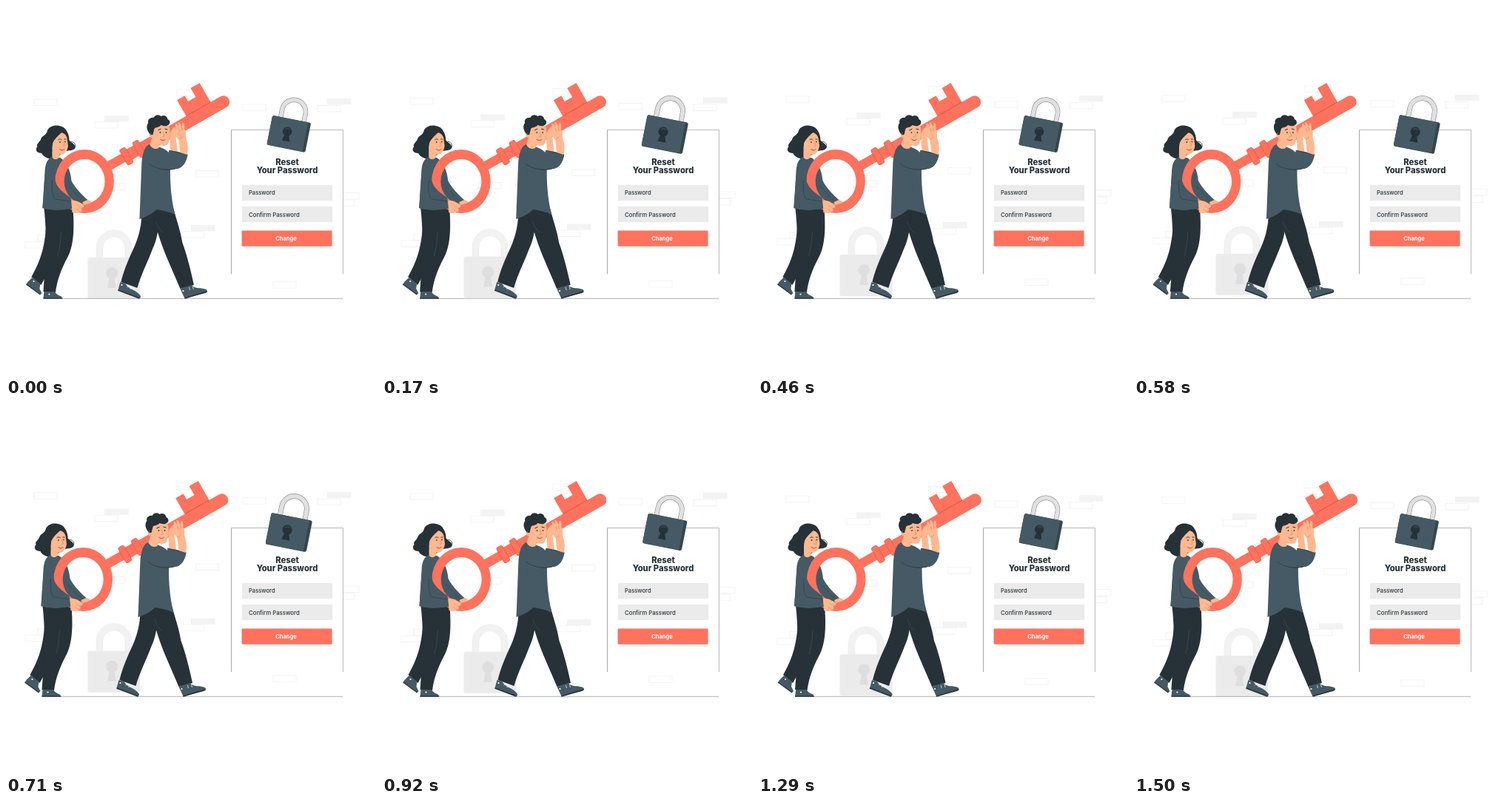
An HTML page with a canvas for the animation above (1.54 s loop, 500 px wide and 500 px high).

```html
<!DOCTYPE html>
<html lang="en">
<head>
<meta charset="utf-8">
<title>Reset Your Password</title>
<style>
html, body { margin: 0; width: 100%; height: 100%; overflow: hidden; background: #fff; }
canvas { display: block; width: 500px; height: 500px; }
</style>
</head>
<body>
<canvas id="stage"></canvas>
<script>
const LOOP = 1540, CYCLE = 1500;
const RED = '#ff725e', RED_LINE = '#c9503f', SKIN = '#ffb88f', SKIN_LINE = '#c9825f';
const SLATE = '#455a64', SHADE = '#37474f', DARK = '#263238', PALE = '#ebebeb';
const canvas = document.getElementById('stage');
const ctx = canvas.getContext('2d');
const ratio = window.devicePixelRatio || 1;
canvas.width = canvas.height = 500 * ratio;

const cache = new Map();
function shape(d) {
  if (!cache.has(d)) cache.set(d, new Path2D(d));
  return cache.get(d);
}
function fill(d, color) {
  ctx.fillStyle = color;
  ctx.fill(shape(d));
}
function line(d, color, width = 0.6) {
  ctx.strokeStyle = color;
  ctx.lineWidth = width;
  ctx.stroke(shape(d));
}
function box(x, y, w, h, color, r = 0) {
  ctx.fillStyle = color;
  ctx.beginPath();
  ctx.roundRect(x, y, w, h, r);
  ctx.fill();
}
function dot(x, y, rx, ry, color) {
  ctx.fillStyle = color;
  ctx.beginPath();
  ctx.ellipse(x, y, rx, ry, 0, 0, 7);
  ctx.fill();
}
function label(text, x, y, font, color, align = 'left') {
  ctx.font = font + ' Inter, sans-serif';
  ctx.fillStyle = color;
  ctx.textAlign = align;
  ctx.fillText(text, x, y);
}
function group(dx, dy, draw) {
  ctx.save();
  ctx.translate(dx, dy);
  draw();
  ctx.restore();
}

// Eased value between [time, value] stops.
function track(stops, t) {
  let i = 1;
  while (i < stops.length - 1 && t > stops[i][0]) i++;
  const [t0, a] = stops[i - 1], [t1, b] = stops[i];
  const k = Math.min(1, Math.max(0, (t - t0) / (t1 - t0)));
  return a + (b - a) * (1 - Math.cos(Math.PI * k)) / 2;
}
const SWAY = [[0, 0], [270, 1.1], [470, -1], [690, -2], [915, 1.1], [1090, -0.7], [1500, 0]];
const BEAT = [[0, 1], [210, 1.07], [420, 1], [630, 1.07], [1050, 1], [1500, 1]];

function drawBlocks() {
  ctx.strokeStyle = '#f1f1f1';
  ctx.lineWidth = 0.8;
  const outlines = [
    [38, 126], [120, 156.5], [231, 113], [320, 133], [421, 134.5], [256.5, 222.5],
    [26, 318.5], [43, 309.5], [237, 304.5], [361, 373], [446, 252.5], [440, 262], [130, 240]
  ];
  for (const [x, y] of outlines) ctx.strokeRect(x, y, 31, 8.5);
  for (const [x, y] of [[434, 125], [133, 148], [250, 296]]) box(x, y, 32.5, 8.3, '#f3f3f3');
}

function drawPalePadlock() {
  line('M126.5 341V327A19.5 19.5 0 0 1 165.5 327V341', '#f2f2f2', 9);
  line('M122 340V327A24 24 0 0 1 170 327V340M131 340V327A15 15 0 0 1 161 327V340', '#e6e6e6', 0.5);
  box(110.5, 340, 71, 56, PALE, 3);
  dot(143.2, 361, 8, 8, '#dedede');
  fill('M140.2 366H146.2L149 381H137Z', '#dedede');
}

function drawForm() {
  box(304.5, 167.5, 151, 195, '#fff');
  line('M304.5 362V167.5', '#909090', 0.8);
  line('M304.5 167.5H455.5V362', '#aaa', 0.8);
  label('Reset', 380, 214.5, '800 11.3px', DARK, 'center');
  label('Your Password', 380, 226.2, '800 11.2px', DARK, 'center');
  box(319, 242, 122, 21, PALE, 0.6);
  box(319, 271, 122, 21, PALE, 0.6);
  label('Password', 328, 254.7, '500 7.6px', DARK);
  label('Confirm Password', 328, 284.7, '500 7.8px', DARK);
  box(318.6, 303.5, 122, 21.2, RED, 1);
  label('Change', 378.5, 316.7, '700 7.5px', '#fff', 'center');
}

function drawPadlock(scale) {
  ctx.save();
  ctx.translate(382, 162);
  ctx.scale(scale, scale);
  ctx.translate(0, 11);
  ctx.rotate(0.195);
  const arch = 'M-15 -17V-31A16 16 0 0 1 17 -31V-17';
  line(arch, '#777', 6.4);
  line(arch, '#e0e0e0', 5.5);
  box(-26.3, -20.5, 53, 40.6, SHADE, 2.5);
  box(-26.3, -20.5, 49.8, 40, SLATE, 2.5);
  line('M23.5 -19V19', DARK, 0.5);
  dot(-2.4, -3, 6.2, 6.2, DARK);
  fill('M-4.6 0H0L3.4 10H-7.4Z', DARK);
  line('M-5.8 -5A4.6 4.6 0 0 1 1 -6', '#607580', 0.5);
  ctx.restore();
}

function drawWoman() {
  // Legs and shoes
  fill('M55 295C53 324 49 341 35 366L48 377C60 356 70 335 74 318Z', DARK);
  fill('M52 273C55 300 56 330 51 386L67.5 387C70 368 76 355 82 343C93 325 93 300 91 272Z', DARK);
  line('M75 305C74 322 72 332 70 338', '#4d5b61', 0.5);
  fill('M36 367L47 375L46 382L49 388L47 390L28 376L30 373Z', SLATE);
  line('M28 376L47 390', DARK, 1.2);
  fill('M52 386H66L70 390L76 393V395.5H51Z', SLATE);
  line('M51 395H77', DARK, 1.2);
  dot(38, 372, 1.1, 1.1, '#fff');
  dot(59, 389.5, 1.1, 1.1, '#fff');

  // Sweater, hair and face
  fill('M62 163C68 160 79 162 82 168C85 172 86 177 86 181C88 185 95 186 94 192C91 196 85 195 82 196L68 205C60 209 51 204 49 199C43 199 39 195 43 190C41 186 47 184 48 179C50 175 54 175 56 170C57 166 59 164 62 163Z', DARK);
  line('M88 183C95 184 96 190 92 193', DARK, 0.8);
  fill('M62 204C55 208 53 216 53 228L50 273C63 277 77 276 91 273L111 266L112 263C103 255 94 246 89 236C88 222 82 210 74 205Z', SLATE);
  line('M86 244L105 264', SHADE, 0.6);
  fill('M64 178C67 168 80 169 83 178L84.5 189C83.5 197 79 202 73 200.5L72 205C68 209 63 207 63 203L63 192Z', SKIN);
  fill('M63 196C61 184 67 179 78 169L70 166C57 167 55 184 58 200Z', DARK);
  line('M71 181C73 179 75 180 76 181M79 180L82 180', DARK, 0.9);
  dot(73.5, 184, 0.8, 1, DARK);
  dot(80.5, 183.5, 0.8, 1, DARK);
  line('M78 183L80 189L77 189.5', SKIN_LINE);
  line('M73 193C75 195.5 78 195.5 80 193', '#8c4638', 0.9);
}

function drawKey() {
  ctx.save();
  ctx.translate(106.7, 237);
  ctx.fillStyle = RED;
  ctx.beginPath();
  ctx.ellipse(0, 0, 39.8, 43, 0, 0, 7);
  ctx.ellipse(0, 0, 27.5, 30, 0, 0, 7);
  ctx.fill('evenodd');
  ctx.rotate(-0.518);
  box(36, -8, 36, 12.5, RED);
  box(66, -9.5, 24, 16, RED);
  box(85, -8.7, 139.5, 16.7, RED, [0, 8, 8, 0]);
  fill('M163 -6V-33.5H175V-24.5H187V-38.5H201V-6Z', RED);
  line('M163.5 -8.7H201', RED_LINE, 0.7);
  for (const u of [61.5, 81.5]) {
    box(u, -13.5, 9, 24, RED, 2.5);
    ctx.strokeStyle = RED_LINE;
    ctx.lineWidth = 0.5;
    ctx.stroke();
  }
  ctx.restore();
}

function drawWomanArm() {
  fill('M56 214C62 216 67 226 67 235C69 246 78 252 88 259L90 274C75 276 61 276 50 273L53 228Z', SLATE);
  line('M63 236C62 248 63 257 67 261L88 264', DARK, 0.5);
  fill('M104 265L111 262C116 263 118 266 113 267L106 269Z', SKIN);
  fill('M89 263C95 262 100 265 104 268C108 270 106 273 102 273C105 276 103 278 100 278C98 281 94 280 90 279Z', SKIN);
  line('M97 269L102 273M96 274L100 278', SKIN_LINE, 0.5);
}

function drawMan() {
  // Legs and shoes
  fill('M198 272C202 300 212 326 220.5 346L236 382L254.5 377C250 355 244 333 239 320C236 302 231 289 227 274Z', DARK);
  fill('M184 279C184 300 178 318 171 332C164 347 159 360 156 373L178 381C183 363 192 346 198 330C203 319 207 309 209 272Z', DARK);
  line('M203 291C207 301 209 303 213 306', '#4d5b61', 0.5);
  fill('M155 373L162 375C166 383 175 383 181 390C184 393 182 395 180 395L152 384Z', SLATE);
  line('M152 384L181 395', DARK, 1.5);
  fill('M236 382L251 377C256 383 265 380 271 383C274 385 272 387 270 388L242 395Z', SLATE);
  line('M242 395L272 386', DARK, 1.5);
  dot(157, 377, 1.1, 1.1, '#fff');
  dot(240, 385, 1.1, 1.1, '#fff');
  line('M164 380L167 378M168 383L171 380M249 384L248 380M254 383L253 379', '#fff', 0.7);

  // Far hand
  fill('M222 177C221 170 226 164 231 162L234 171L230 178L233 200L223 200Z', SKIN);

  // Shirt
  fill('M194 187C188 190 185 199 184 211L181 288C188 286 198 281 204 275C212 276 221 278 229 282C225 265 222.5 248 222.5 223L223 201C219 195 213 192 206 190Z', SLATE);
  fill('M194 212C202 221 217 224 230 220C238 220 243 212 246 202L235 198C230 203 219 204 211 202C203 201 198 205 194 212Z', SHADE);
  fill('M190 204C197 196 208 196 220 199L221 195L233 197L246 200C245 211 239 220 230 220C215 222 201 221 190 213Z', SLATE);
  line('M194 213C203 221 216 222 230 220M221 195L246 201', DARK, 0.6);

  // Head
  fill('M197 165C200 158 218 157 221 162C223 171 222 181 219 187C216 190 211 189 208 187L207 192C202 195 196 191 195 187L198 178C193 178 193 170 197 169Z', SKIN);
  fill('M196 174C190 168 190 161 193 158C191 153 197 150 200 151C203 146 208 147 210 149C215 146 219 150 219 153C224 155 222 161 219 161C216 164 212 161 210 161C207 165 203 163 201 166L199 174Z', DARK);
  line('M206 168L210 166M215 166L219 167', DARK, 1);
  dot(209, 171, 0.8, 1, DARK);
  dot(217, 171, 0.8, 1, DARK);
  line('M213 170L215 176L211.5 177', SKIN_LINE);
  line('M209 180C211 182 214 182 216 180', '#8c4638', 0.9);
  line('M197 171C195 172 196 176 198 176', SKIN_LINE, 0.5);

  // Near hand
  fill('M236 198L234 181C229 176 229 170 230 167L229 160C230 157 233 160 234 165L233 158C235 155 237 159 238 164L239 158C242 157 242 162 242 167C245 170 243 175 244 179C247 188 247 195 245 201Z', SKIN);
  line('M234 165L236 170M238 164L239 169M234 181L239 177', SKIN_LINE, 0.6);
}

function render(now) {
  const t = Math.min(now % LOOP, CYCLE);
  const lift = -6.7 * (1 - Math.abs(1 - 2 * t / CYCLE));
  ctx.setTransform(ratio, 0, 0, ratio, 0, 0);
  ctx.fillStyle = '#fff';
  ctx.fillRect(0, 0, 500, 500);
  group(0, lift, () => {
    drawBlocks();
    drawPalePadlock();
  });
  line('M51 395.3H455', '#aaa', 0.9);
  drawForm();
  drawPadlock(track(BEAT, t));
  group(track(SWAY, t) - 0.6, 0, () => {
    drawWoman();
    drawKey();
    drawWomanArm();
    drawMan();
  });
  requestAnimationFrame(render);
}
requestAnimationFrame(render);
</script>
</body>
</html>
```
